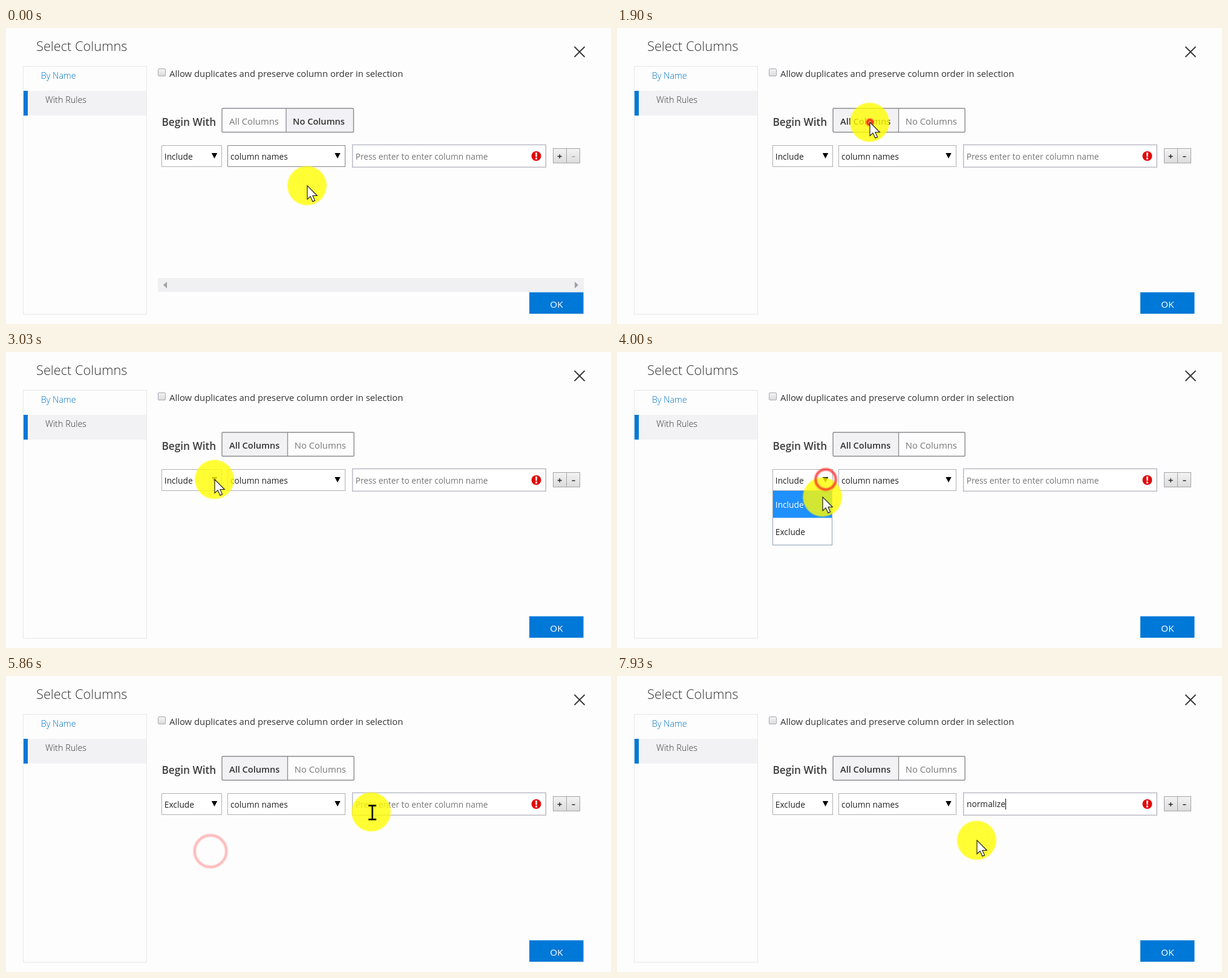
Recreate the animation shown at these times as an HTML page. Size 1000x490 px, loop 8000 ms.

```html
<!DOCTYPE html>
<html lang="en">
<head>
<meta charset="utf-8">
<title>Select Columns</title>
<style>
html, body { margin: 0; width: 100%; height: 100%; overflow: hidden; background: #fdfdfd; }
body { font-family: "Open Sans", "Noto Sans", sans-serif; }
svg { position: absolute; left: 0; top: 0; width: 1000px; height: 490px; }
text { font-size: 14.85px; fill: #333; }
.title { font-size: 21.8px; font-weight: 300; fill: #333; }
.nav { font-size: 14.4px; font-weight: 300; }
.head { font-size: 17.2px; font-weight: 600; fill: #3c3c3c; }
.picked { font-size: 14.6px; font-weight: 600; }
.idle { fill: #777; }
.field, .typed { font-size: 13.75px; fill: #222; }
.hint { fill: #757575; }
.light { fill: #fff; }
.typed {
  position: absolute; left: 578px; top: 203px; height: 18px; line-height: 18px;
  color: #222; border-right: 1.5px solid #000;
}
[data-on] { opacity: 0; }

.pointer { animation: travel 8s linear infinite; }
@keyframes travel {
  0%, 10.375% { transform: translate(498px, 261px); animation-timing-function: cubic-bezier(.4, .1, .8, .8); }
  13.25% { transform: translate(432px, 179px); animation-timing-function: ease-out; }
  15.75% { transform: translate(421px, 155px); animation-timing-function: step-end; }
  18.75%, 26.25% { transform: translate(418px, 156px); animation-timing-function: ease-in; }
  30% { transform: translate(383px, 189px); }
  32% { transform: translate(353px, 198px); }
  34.375% { transform: translate(347px, 206px); animation-timing-function: ease-out; }
  37.875%, 47% { transform: translate(345px, 211px); animation-timing-function: ease-in; }
  50% { transform: translate(340px, 240px); }
  54.375% { transform: translate(337px, 278px); animation-timing-function: ease-out; }
  58.125%, 66.625% { transform: translate(338px, 290px); animation-timing-function: cubic-bezier(.45, 0, .5, 1); }
  72% { transform: translate(600px, 228px); }
  73.25% { transform: translate(604px, 225px); animation-timing-function: ease-out; }
  75%, 79.125% { transform: translate(605px, 223px); animation-timing-function: ease-in-out; }
  82.5%, 100% { transform: translate(595px, 272px); }
}

.ring { fill: none; stroke: #f22; opacity: 0; animation: fade 8s linear infinite; }
.ring circle { animation: grow 8s linear infinite; animation-delay: inherit; }
@keyframes grow {
  0% { r: 0; }
  12.875%, 100% { r: 30px; }
}
@keyframes fade {
  0% { opacity: 1; }
  3.2% { opacity: .98; }
  6.4% { opacity: .87; }
  9.6% { opacity: .58; }
  11.6% { opacity: .27; }
  12.875%, 100% { opacity: 0; }
}
</style>
</head>
<body>
<svg viewBox="0 0 1000 490">
  <defs>
    <linearGradient id="key" x2="0" y2="1">
      <stop stop-color="#f3f3f3"/><stop offset="1" stop-color="#dcdcdc"/>
    </linearGradient>
  </defs>

  <text class="title" x="50" y="38">Select Columns</text>
  <path d="M939.5 31L956.5 48M956.5 31L939.5 48" stroke="#333" stroke-width="1.8"/>

  <rect x="28.5" y="63.5" width="204" height="410.5" fill="none" stroke="#e6e6e6"/>
  <rect x="29" y="104" width="203" height="41" fill="#f2f2f4"/>
  <rect x="29" y="104" width="7" height="41" fill="#0078d7"/>
  <text class="nav" x="57.7" y="84" style="fill:#0072c6">By Name</text>
  <text class="nav" x="65" y="124">With Rules</text>

  <rect x="251.5" y="67.5" width="12" height="12" rx="1.5" fill="url(#key)" stroke="#a6a8b4"/>
  <text x="270" y="81">Allow duplicates and preserve column order in selection</text>

  <text class="head" x="257.5" y="161.5">Begin With</text>
  <g data-on="0 1830">
    <rect x="463" y="133" width="111.5" height="39.5" fill="#f2f2f6"/>
    <path d="M463 133V172.5" stroke="#8a8a92" stroke-width="1.3"/>
    <rect x="357" y="133" width="217.5" height="39.5" rx="1.5" fill="none" stroke="#8a8a92" stroke-width="1.4"/>
    <text class="idle" x="369" y="159.5">All Columns</text>
    <text class="picked" x="474" y="159.5">No Columns</text>
  </g>
  <g data-on="1830 8000">
    <rect x="357" y="133" width="108.5" height="39.5" fill="#f2f2f4"/>
    <path d="M465.5 133V172.5" stroke="#8a8a8e" stroke-width="1.3"/>
    <rect x="357" y="133" width="218.2" height="39.5" rx="1.5" fill="none" stroke="#8a8a8e" stroke-width="1.4"/>
    <text class="picked" x="369" y="159.5">All Columns</text>
    <text class="idle" x="476.7" y="159.5">No Columns</text>
  </g>

  <g fill="#fff" stroke="#b0b0b4">
    <rect x="257.5" y="194.5" width="99" height="35"/>
    <rect x="366.5" y="194.5" width="194" height="35"/>
    <rect x="572.7" y="193.4" width="319.6" height="37" stroke="#b9bbc4" stroke-width="1.5"/>
  </g>
  <rect data-on="0 1830" x="366.5" y="194.5" width="194" height="35" fill="none" stroke="#858585"/>
  <path d="M339.8 207h9.4l-4.7 9zM543.3 207h9.4l-4.7 9z"/>
  <text class="field" data-on="0 4990" x="261.8" y="217.5">Include</text>
  <text class="field" data-on="4990 8000" x="261.8" y="217.5">Exclude</text>
  <text class="field" x="371" y="217.5">column names</text>
  <text class="field hint" data-on="0 6330" x="577.7" y="217.5">Press enter to enter column name</text>

  <circle cx="876.5" cy="212" r="8" fill="#e20a0a"/>
  <path d="M875 206.3h3l-.5 7.2h-2zM875.1 214.7h2.8v2.8h-2.8z" fill="#fff"/>

  <rect x="904.5" y="199.5" width="44" height="24" fill="url(#key)" stroke="#a4a4a8"/>
  <path d="M926.5 199.5v24" stroke="#a4a4a8"/>
  <path d="M911.7 212.5h7M915.2 209v7" stroke="#222" stroke-width="1.3"/>
  <path d="M935.5 213h5" stroke="#999" stroke-width="1.3"/>
  <path data-on="1830 8000" d="M935.5 213h5" stroke="#333" stroke-width="1.4"/>

  <g data-on="0 930">
    <rect x="251" y="414" width="704" height="23" fill="#f0f0f2"/>
    <path d="M266 420v11l-6-5.5zM940 420v11l6-5.5z" fill="#a0a0a4"/>
  </g>
  <rect x="865" y="437.5" width="89.5" height="35.5" fill="#0078d7"/>
  <text class="light" x="899.3" y="462.5" style="font-size:15.2px">OK</text>

  <g data-on="3460 4990">
    <rect x="257.5" y="229.5" width="98" height="90" fill="#fff"/>
    <g data-on="3460 4330">
      <rect x="258" y="230" width="97" height="44.5" fill="#1e90ff"/>
      <text class="field light" x="261.8" y="258">Include</text>
      <text class="field" x="261.8" y="303">Exclude</text>
    </g>
    <g data-on="4330 4990">
      <rect x="258" y="274.5" width="97" height="45" fill="#1e90ff"/>
      <text class="field" x="261.8" y="258">Include</text>
      <text class="field light" x="261.8" y="303">Exclude</text>
    </g>
    <rect x="257.5" y="229.5" width="98" height="90" fill="none" stroke="#8fa0b8"/>
  </g>
</svg>

<div id="entry"></div>

<svg viewBox="0 0 1000 490">
  <defs>
    <radialGradient id="glow">
      <stop offset=".92" stop-color="#fffc00" stop-opacity=".8"/>
      <stop offset="1" stop-color="#fffc00" stop-opacity="0"/>
    </radialGradient>
    <path id="arrow" d="M0 0V22.5L5 17.8L9 26.2L12.6 24.6L8.9 16.5H16.3Z" fill="#fff" stroke="#111" stroke-width="1.1"/>
  </defs>
  <g class="pointer"><circle r="33.6" cx="-.4" fill="url(#glow)"/></g>
  <g id="rings"></g>
  <g class="pointer">
    <use href="#arrow" data-on="0 5740"/>
    <path data-on="5740 6430" d="M-5 -10.5H8M-5 12.5H8M1.5 -10.5V12.5" fill="none" stroke="#000" stroke-width="2.4"/>
    <use href="#arrow" data-on="6430 8000"/>
  </g>
</svg>
<script>
const LOOP = 8000;
const entry = document.getElementById('entry');
const rings = document.getElementById('rings');
const SVG = 'http://www.w3.org/2000/svg';

// Typed text: start time and number of letters shown.
const word = 'normalize';
const strokes = [[6330, 0], [6900, 1], [7060, 2], [7300, 3], [7530, 4], [7560, 5], [7730, 7], [7800, 8], [7930, 9]];
strokes.forEach(([from, count], i) => {
  const span = document.createElement('span');
  const to = i + 1 < strokes.length ? strokes[i + 1][0] : LOOP;
  span.className = 'typed';
  span.dataset.on = `${from} ${to}`;
  span.textContent = word.slice(0, count);
  entry.append(span);
});

// Click ripples: time and centre.
for (const [time, x, y] of [[1760, 418, 156], [3430, 345, 211], [4960, 338, 290], [6330, 605, 223]]) {
  const ring = document.createElementNS(SVG, 'g');
  ring.setAttribute('class', 'ring');
  ring.style.animationDelay = `${time}ms`;
  for (const [width, alpha] of [[6.5, .35], [3.4, .85]]) {
    const circle = document.createElementNS(SVG, 'circle');
    circle.setAttribute('cx', x);
    circle.setAttribute('cy', y);
    circle.setAttribute('stroke-width', width);
    circle.setAttribute('stroke-opacity', alpha);
    ring.append(circle);
  }
  rings.append(ring);
}

// Each data-on element is visible from its first to its second time.
const key = (time, opacity) => ({ offset: time / LOOP, opacity, easing: 'step-end' });
for (const el of document.querySelectorAll('[data-on]')) {
  const [from, to] = el.dataset.on.split(' ').map(Number);
  const keys = from > 0 ? [key(0, 0), key(from, 1)] : [key(0, 1)];
  if (to < LOOP) keys.push(key(to, 0));
  keys.push(key(LOOP, 0));
  el.animate(keys, { duration: LOOP, iterations: Infinity });
}
</script>
</body>
</html>
```
